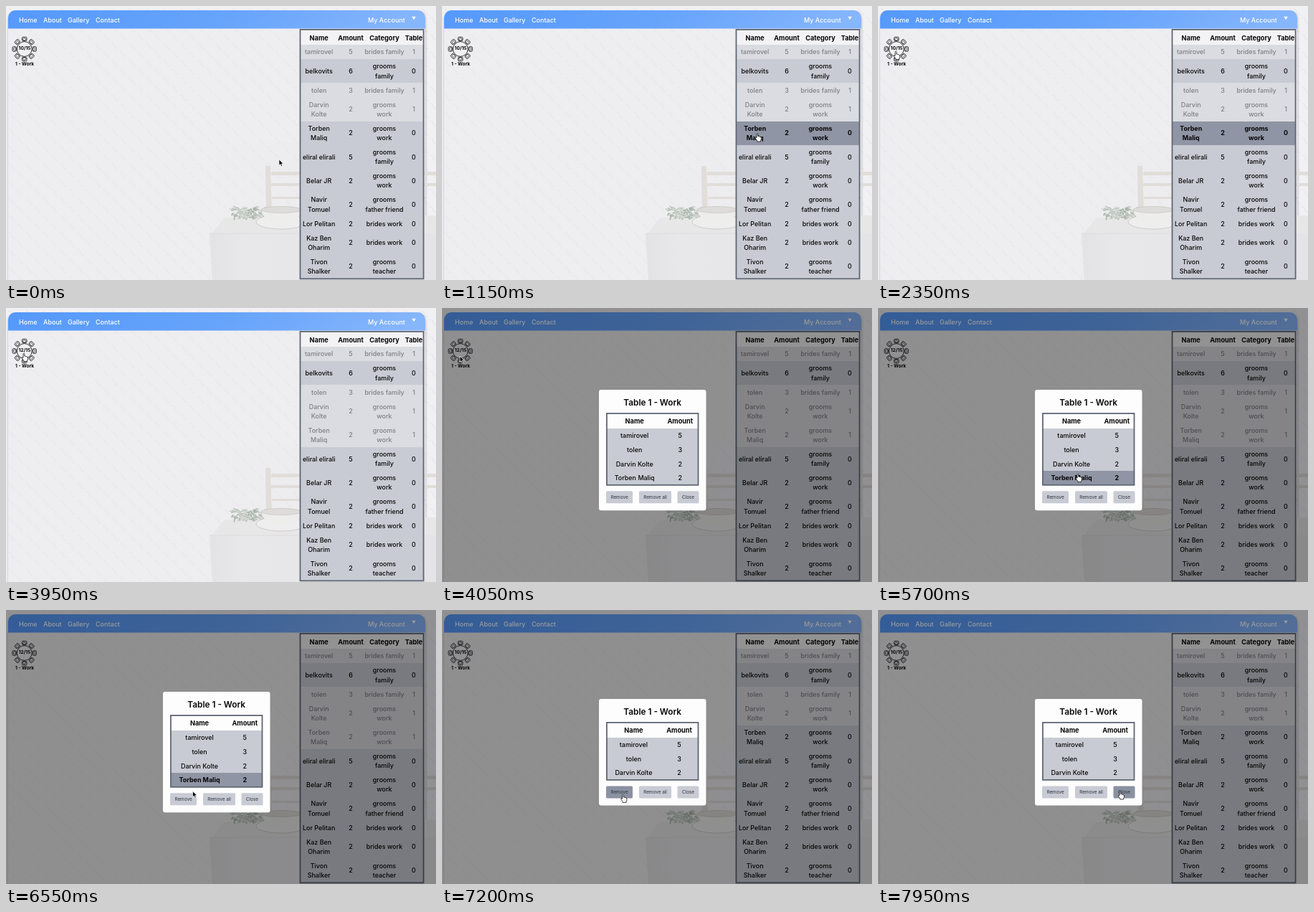
Animation, 600 px wide and 382 px high, one loop 8000 ms. Source, as an HTML page:

```html
<!DOCTYPE html>
<html lang="en">
<head>
<meta charset="utf-8">
<title>Table seating</title>
<style>
  html, body { margin: 0; width: 100%; height: 100%; overflow: hidden; background: #eeedf0; }
  svg { display: block; width: 100vw; height: 100vh; }
  text { font-family: Inter, Roboto, "Liberation Sans", sans-serif; }
</style>
</head>
<body>
<svg viewBox="0 0 600 382" preserveAspectRatio="none">
  <defs>
    <linearGradient id="bar" x1="0" y1="0" x2="1" y2="0.05">
      <stop offset="0" stop-color="#5599fb"/>
      <stop offset="0.55" stop-color="#67a4fb"/>
      <stop offset="1" stop-color="#86b6fc"/>
    </linearGradient>
    <linearGradient id="cloth" x1="0" y1="0" x2="1" y2="0">
      <stop offset="0" stop-color="#e3e2e4"/>
      <stop offset="0.15" stop-color="#e8e7e9"/>
      <stop offset="1" stop-color="#e4e3e5"/>
    </linearGradient>
    <linearGradient id="haze" x1="0" y1="0" x2="1" y2="0">
      <stop offset="0" stop-color="#e6e5e8" stop-opacity="0"/>
      <stop offset="1" stop-color="#e6e5e8"/>
    </linearGradient>
    <pattern id="weave" width="24" height="24" patternUnits="userSpaceOnUse">
      <path d="M3 4q4 0 5 4t5 4M15 16q4 0 5 4t4 3" fill="none" stroke="#e8e7ea" stroke-width="1.1"/>
    </pattern>
    <filter id="soft" x="-10%" y="-10%" width="120%" height="120%"><feGaussianBlur stdDeviation="1.4"/></filter>
  </defs>
  <rect width="600" height="382" fill="#f1f0f3"/>
  <rect width="600" height="382" fill="url(#weave)"/>
  <path d="M3 390V18a10 10 0 0 1 10-10H575.5a10 10 0 0 1 10 10V390Z" fill="#777a84" opacity=".5" filter="url(#soft)"/>
  <path d="M3 382V16a10 10 0 0 1 10-10H575a10 10 0 0 1 10 10V382Z" fill="#eeedf0"/>
  <rect x="3" y="32" width="582" height="350" fill="url(#weave)"/>
  <g id="photo">
    <rect x="290" y="190" width="295" height="127" fill="url(#haze)" opacity=".35"/>
    <g fill="#e1ddd9">
      <path d="M362 223h7l2 69h-8Z"/>
      <path d="M370 231h230v5H370ZM370 247h230v4H370ZM371 266h214v3H371Z"/>
    </g>
    <path d="M304 296Q345 290 420 292H600V318H286Z" fill="#e8e7e8"/>
    <path d="M284 317H600V382H288Z" fill="url(#cloth)"/>
    <path d="M284 317H585" stroke="#dddcde"/>
    <g id="leaves" stroke-linecap="round"></g>
    <ellipse cx="384" cy="301" rx="35" ry="10" fill="#efeeef" stroke="#cfccc8"/>
    <path d="M356 284Q359 299 377 301H395Q410 298 412 284Z" fill="#ededec"/>
    <ellipse cx="384" cy="284" rx="28" ry="4.5" fill="#dedcda" stroke="#cbc8c2" stroke-width=".8"/>
  </g>
  <path d="M3 31.6V16a10 10 0 0 1 10-10H575a10 10 0 0 1 10 10V31.6Z" fill="url(#bar)"/>
  <g id="nav"></g>
  <g id="ui"></g>
  <g id="cursor">
    <path id="arrow" d="M0 0V8.2L1.9 6.5 3.2 9.4 4.6 8.8 3.3 6H5.8Z" fill="#000" stroke="#fff" stroke-width=".7"/>
    <path id="hand" d="M-1 -2.6q0-1 .9-1t.9 1V.2q1.2-.6 1.6.4 1.2-.4 1.5.5 1.5-.3 1.5 1.1V4q0 1-.8 2.2V7.5H-.2V6.4L-2.7 2.9q-.5-.9.2-1.3.7-.2 1.5.8Z" fill="#fff" stroke="#111" stroke-width=".8" stroke-linejoin="round"/>
  </g>
</svg>
<script>
const $ = id => document.getElementById(id);

const guests = [
  ["tamirovel", 5, "brides family", 1],
  ["belkovits", 6, "grooms|family", 0],
  ["tolen", 3, "brides family", 1],
  ["Darvin|Kolte", 2, "grooms|work", 1],
  ["Torben|Maliq", 2, "grooms|work", 0],
  ["eliral elirali", 5, "grooms|family", 0],
  ["Belar JR", 2, "grooms|work", 0],
  ["Navir|Tomuel", 2, "grooms|father friend", 0],
  ["Lor Pelitan", 2, "brides work", 0],
  ["Kaz Ben|Oharim", 2, "brides work", 0],
  ["Tivon|Shalker", 2, "grooms|teacher", 0]
];
const MOVED = 4;
const LOOP = 8000;
const EVENTS = { pick: 1080, seat: 2700, open: 4050, mark: 5500, remove: 7050 };
const CELL = "#c8cbd3", HOVER = "#dedee6", PICKED = "#8f95a4", EDGE = "#5f6774";

// time, x, y of the pointer's hot spot
const path = [
  [0, 381, 214], [250, 381, 214], [1000, 440, 181.5], [1250, 440, 181.5],
  [2150, 25, 67], [4200, 25, 67], [5100, 282.5, 228], [5200, 282.5, 228],
  [5400, 279, 235], [5750, 279, 235], [6500, 260.5, 252.6], [6580, 260.5, 252.6],
  [6800, 251, 263], [7150, 251, 261], [7800, 338, 256.5], [LOOP, 338, 256.5]
];

const rect = (x, y, w, h, fill, extra = "") =>
  `<rect x="${x}" y="${y}" width="${w}" height="${h}" fill="${fill}" ${extra}/>`;

// row backgrounds sit on whole pixels so that neighbours leave no seam
const band = (x, top, w, bottom, fill) =>
  rect(x, Math.round(top), w, Math.round(bottom) - Math.round(top), fill);

function label(str, x, y, size = 8.95, weight = 500, fill = "#060607", anchor = "middle") {
  const lines = String(str).split("|");
  return lines.map((s, i) => {
    const base = y + size * 0.36 + (i - (lines.length - 1) / 2) * 13.2;
    return `<text x="${x}" y="${base.toFixed(2)}" font-size="${size}" font-weight="${weight}" fill="${fill}" text-anchor="${anchor}">${s}</text>`;
  }).join("");
}

let rowTop = 54.2;
const rows = guests.map(g => {
  const h = (g[0] + g[2]).includes("|") ? 33.2 : 20;
  const row = { top: rowTop, h };
  rowTop += h;
  return row;
});

function pointer(t) {
  let i = 0;
  while (i < path.length - 2 && t >= path[i + 1][0]) i++;
  const [t0, x0, y0] = path[i], [t1, x1, y1] = path[i + 1];
  const p = (t - t0) / (t1 - t0), e = p * p * (3 - 2 * p);
  return [x0 + (x1 - x0) * e, y0 + (y1 - y0) * e];
}

function modalBox(count) {
  const h = 89 + 19.8 * count, top = 198.2 - h / 2;
  return { h, top, table: top + 32, first: top + 53.6, buttons: top + h - 27 };
}

const buttons = [["Remove", 229, 37], ["Remove all", 275, 45], ["Close", 328.5, 30]];

function stateAt(t) {
  const [x, y] = pointer(t);
  const seated = t >= EVENTS.seat && t < EVENTS.remove;
  const s = {
    seated, open: t >= EVENTS.open,
    picked: t >= EVENTS.pick && t < EVENTS.seat,
    marked: t >= EVENTS.mark && t < EVENTS.remove,
    row: -1, line: -1, button: -1, icon: false
  };
  if (s.open) {
    const count = seated ? 4 : 3, m = modalBox(count);
    const n = Math.floor((y - m.first) / 19.8);
    if (x > 230 && x < 357 && n >= 0 && n < count) s.line = n;
    if (y > m.buttons && y < m.buttons + 17)
      s.button = buttons.findIndex(b => x > b[1] && x < b[1] + b[2]);
  } else {
    s.icon = Math.hypot(x - 26, y - 60) < 17;
    if (x > 411 && x < 582)
      s.row = rows.findIndex((r, i) => y >= r.top && y < r.top + r.h && !tableOf(i, seated));
  }
  return s;
}

const tableOf = (i, seated) => i === MOVED ? +seated : guests[i][3];

function seatIcon(count) {
  let out = "";
  for (let i = 0; i < 8; i++)
    out += `<g transform="translate(25.7 60) rotate(${i * 45})">
      <rect x="-3.3" y="-16.7" width="6.6" height="5.2" rx="1.6"/>
      <rect x="-1.9" y="-15" width="3.8" height="3" rx=".8" stroke-width=".7"/></g>`;
  return `<g fill="#f1f0f3" stroke="#1b1b1e" stroke-width=".9">${out}<circle cx="25.7" cy="60" r="10.4"/></g>` +
    label(count + "/15", 26, 59, 6.6, 700) + label("1 - Work", 26, 80.6, 6.5, 700);
}

function sidebar(s) {
  const frame = [410.5, 32.9, 172.1, 347.4];
  const cols = [436.7, 481, 528, 569];
  let out = rect(...frame, "#f3f3f5");
  ["Name", "Amount", "Category", "Table"].forEach((h, i) => out += label(h, cols[i], 44.3, 9.2, 700));
  guests.forEach((g, i) => {
    const { top, h } = rows[i], table = tableOf(i, s.seated);
    const on = s.picked && i === MOVED;
    const fill = on ? PICKED : table ? "#dbdce1" : s.row === i ? HOVER : CELL;
    out += band(411, top, 171, top + h, fill);
    [g[0], g[1], g[2], table].forEach((v, c) =>
      out += label(v, cols[c], top + h / 2, 8.95, on ? 700 : 500, table ? "#7e7f83" : undefined));
  });
  return out + rect(...frame, "none", `stroke="${EDGE}" stroke-width="1.8"`);
}

function modal(s) {
  const list = guests.filter((g, i) => tableOf(i, s.seated));
  const m = modalBox(list.length);
  const [nx, ax] = s.marked ? [270, 333.3] : s.seated ? [268.7, 332.3] : [267.4, 331];
  const tableH = 21.6 + 19.8 * list.length;
  let out = rect(0, 0, 600, 382, "#000", 'opacity=".4"') +
    rect(219, m.top, 149.5, m.h, "#fdfdfe", 'rx="3"') +
    label("Table 1 - Work", 293.7, m.top + 18, 11.8, 600) +
    label("Name", nx, m.table + 11.8, 9.2, 700) + label("Amount", ax, m.table + 11.8, 9.2, 700);
  list.forEach((g, i) => {
    const y = m.first + i * 19.8, on = s.marked && i === 3, weight = on ? 700 : 500;
    out += band(230, y, 127.5, y + 19.8, on ? PICKED : s.line === i ? HOVER : CELL) +
      label(g[0].replace("|", " "), nx, y + 10, 8.95, weight) + label(g[1], ax, y + 10, 8.95, weight);
  });
  out += rect(229.9, m.table + 0.9, 127.6, tableH - 1, "none", `stroke="${EDGE}" stroke-width="1.8"`);
  buttons.forEach(([name, x, w], i) =>
    out += rect(x, m.buttons, w, 17, s.button === i ? "#8a92a1" : CELL, 'rx="1.6"') +
      label(name, x + w / 2, m.buttons + 8.7, 6.4, 400, "#2c3341"));
  return out;
}

function drawStatic() {
  const links = [["Home", 18], ["About", 52], ["Gallery", 86], ["Contact", 125], ["My Account", 505]];
  $("nav").innerHTML = links.map(([s, x]) => label(s, x, 19.6, 9, 500, "#fff", "start")).join("") +
    '<path d="M566.4 14.8H571.8L569.1 19.2Z" fill="#fff"/>';
  let leaves = "", seed = 7;
  const rnd = () => (seed = seed * 16807 % 2147483647) / 2147483647;
  const greens = ["#a9b5aa", "#bcc6bd", "#cdd3cc"];
  for (let i = 0; i < 130; i++) {
    const x = 315 + rnd() * 50, a = rnd() * 6.28;
    const y = 287 + (rnd() - 0.4) * 15;
    leaves += `<path d="M${x.toFixed(1)} ${y.toFixed(1)}l${(4 * Math.cos(a)).toFixed(1)} ${(2.5 * Math.sin(a)).toFixed(1)}" stroke="${greens[i % 3]}" stroke-width="1.7"/>`;
  }
  $("leaves").innerHTML = leaves;
}

let last = "";
function render(t) {
  const s = stateAt(t), key = JSON.stringify(s);
  if (key !== last) {
    last = key;
    $("ui").innerHTML = seatIcon(s.seated ? 12 : 10) + sidebar(s) + (s.open ? modal(s) : "");
    const link = s.icon || s.row >= 0 || s.line >= 0 || s.button >= 0;
    $("hand").style.display = link ? "" : "none";
    $("arrow").style.display = link ? "none" : "";
  }
  const [x, y] = pointer(t);
  $("cursor").setAttribute("transform", `translate(${x.toFixed(2)} ${y.toFixed(2)})`);
}

drawStatic();
const start = performance.now();
function tick() {
  render((performance.now() - start) % LOOP);
  requestAnimationFrame(tick);
}
tick();
</script>
</body>
</html>
```
